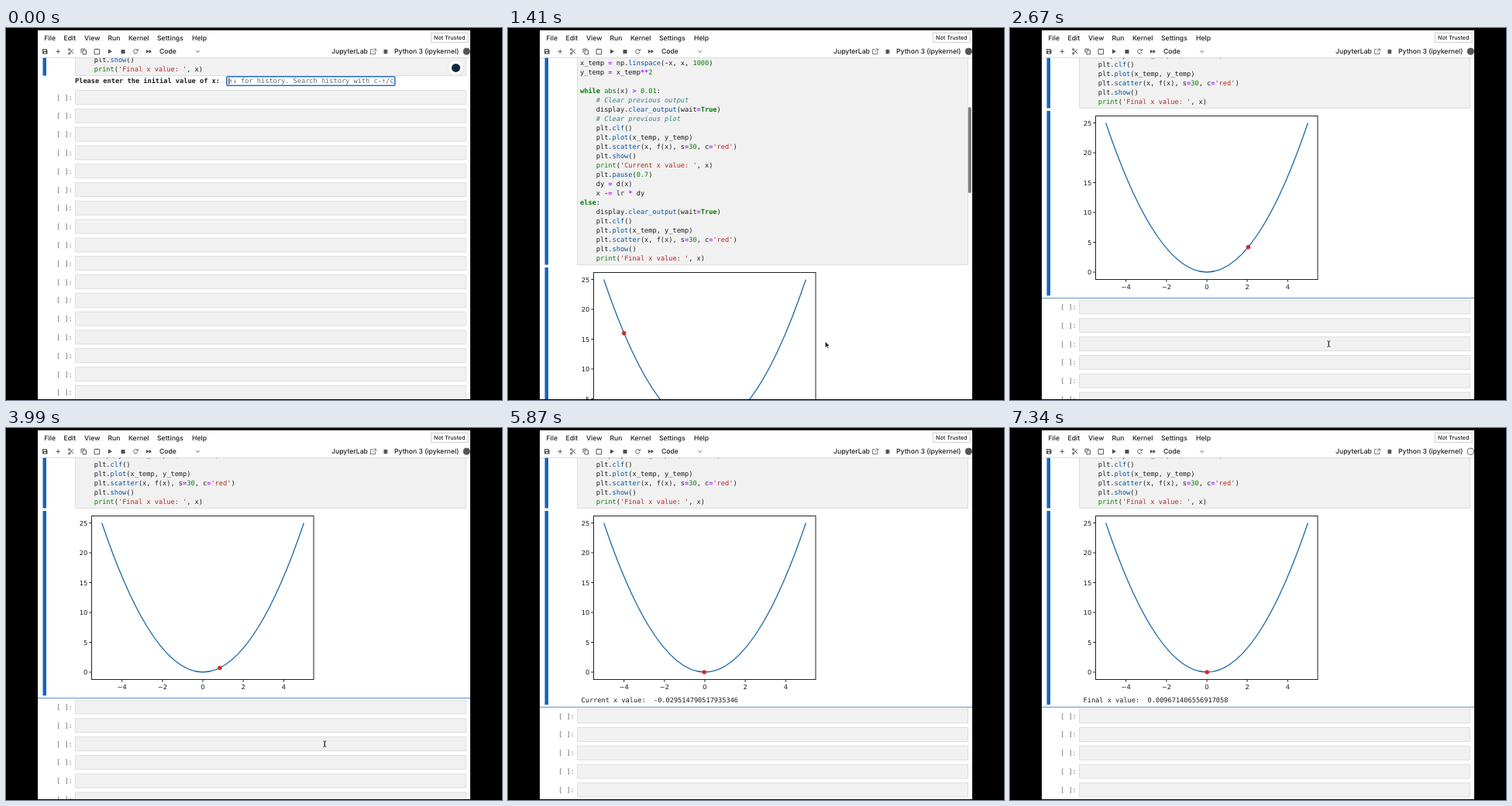
An HTML page for the animation above (7940 ms loop, 640x480 px).

```html
<!DOCTYPE html>
<html lang="en">
<head>
<meta charset="utf-8">
<title>Gradient descent notebook</title>
<style>
  html, body { margin: 0; width: 100%; height: 100%; overflow: hidden; background: #000; }
  svg { display: block; width: 640px; height: 480px; }
  text { white-space: pre; text-rendering: geometricPrecision; fill: #1c1c1c; }
  .ui { font: 500 8.65px Inter, sans-serif; }
  .mono { font: 8.64px "DejaVu Sans Mono", monospace; }
  .tick { font: 8.3px "DejaVu Sans", sans-serif; }
  .kw { fill: #008000; font-weight: bold; }
  .fn, .num { fill: #008000; }
  .str { fill: #ba2121; }
  .com { fill: #408080; font-style: italic; }
  .op { fill: #aa22ff; font-weight: bold; }
  .prop { fill: #0055aa; }
  .bar { fill: #1565c0; }
  .cell { fill: #f1f1f1; stroke: #dedede; }
  .prompt { fill: #707070; }
  .icon { fill: none; stroke: #5a5a5a; stroke-width: 1; }
  .solid { fill: #505050; }
</style>
</head>
<body>
<svg viewBox="0 0 640 480">
  <defs>
    <clipPath id="page"><rect x="41" y="38" width="558" height="441"/></clipPath>
    <clipPath id="window"><rect x="41" y="3" width="558" height="476"/></clipPath>
    <clipPath id="field"><rect x="286" y="8" width="214" height="14"/></clipPath>
  </defs>
  <rect width="640" height="480"/>
  <rect x="41" y="3" width="558" height="476" fill="#fff"/>

  <g clip-path="url(#page)">
    <g id="doc">
      <rect class="cell" x="89.5" y="-340" width="504" height="348.5"/>
      <rect class="bar" x="47.5" y="-340" width="4.5" height="348.5"/>
      <g id="code" class="mono"></g>
      <rect id="outBar" class="bar" x="47.5" y="12" width="4.5"/>
      <rect id="edge" x="41" width="558" height="1.2" fill="#6f9bd3"/>

      <g id="ask" class="mono">
        <text x="89" y="18" font-weight="bold">Please enter the initial value of x:  </text>
        <text id="answer" x="288" y="18">5</text>
        <g id="entry">
          <rect x="284.8" y="9.8" width="217" height="11.5" rx="1.5" fill="none" stroke="#2a6fc4" stroke-width="1.6"/>
          <text id="hint" x="287.5" y="18" clip-path="url(#field)" style="fill:#686868">↑↓ for history. Search history with c-↑/c-↓</text>
          <rect id="caret" y="11.5" width="1" height="8" fill="#111"/>
        </g>
      </g>

      <g id="plot">
        <g id="ticks" class="tick"></g>
        <path id="curve" fill="none" stroke="#1f6aa8" stroke-width="1.3"/>
        <rect x="110.5" y="18.5" width="286.5" height="211" fill="none" stroke="#222"/>
        <circle id="dot" r="2.7" fill="#d32630"/>
        <text id="value" class="mono" x="94.5" y="258.6"></text>
      </g>
      <g id="cells" class="mono"></g>
    </g>
    <rect id="thumb" x="593.8" width="4" height="111" rx="2" fill="#7d7d7d"/>
    <g id="badge">
      <circle cx="580.5" cy="52" r="10.6" fill="#d9d9d9"/>
      <circle cx="580.5" cy="51.4" r="10" fill="#fff"/>
      <circle cx="580.5" cy="51.4" r="5.5" fill="#12293f"/>
    </g>
  </g>

  <path d="M41 38.3H599" stroke="#d4d4d4" stroke-width=".8"/>
  <g id="menu" class="ui"></g>
  <rect x="548.5" y="6.5" width="47.5" height="12" fill="#fff" stroke="#c6c6c6" stroke-width=".8"/>
  <text class="ui" x="552" y="15.2" style="font-size:7.2px">Not Trusted</text>
  <text class="ui" x="198" y="33.4">Code</text>
  <text class="ui" x="420" y="33.4">JupyterLab</text>
  <text class="ui" x="501" y="33.4" id="kernel">Python 3 (ipykernel)</text>

  <g class="icon" clip-path="url(#window)">
    <path class="solid" stroke="none" fill-rule="evenodd" d="M47 27h5l1.5 1.5V33.500H47zM48 28v1.500h3.500V28zM50.200 30.500a1.100 1.100 0 1 0 .01 0z"/>
    <path d="M64.500 30.300h5.400M67.200 27.600v5.400"/>
    <path d="M81.500 27.500l5.500 5.500M81.500 33l5.500-5.500"/>
    <circle cx="81.600" cy="27.800" r="1.200"/><circle cx="81.600" cy="32.900" r="1.200"/>
    <path d="M97 32V27h5M99 28.700h4.500v5.300h-4.500z"/>
    <path d="M114 27.300h6.500v6.500h-6.500zM115.700 27.500h3.200"/>
    <path class="solid" stroke="none" d="M132 27.300l5 3-5 3zM148.500 28h5v5h-5zM181 27.700l3.500 2.600-3.500 2.600zM184.500 27.700l3.500 2.600-3.500 2.600z"/>
    <path d="M169.500 28.700a2.700 2.700 0 1 0 .4 2.300M170.300 27v2.200h-2.200"/>
    <path d="M245.500 29.300l2.200 2.200 2.200-2.200"/>
    <path d="M473.500 27.500h-3v6h6v-3M474.500 27h2.800v2.800M477 27.300l-3.500 3.500" stroke-width=".8"/>
    <path d="M487 28.500h5.500M486.500 30.500h6.500M487 32.500h5.500" stroke-width=".8"/>
    <ellipse class="solid" stroke="none" cx="489.800" cy="30.500" rx="2" ry="2.900"/>
    <circle id="status" cx="594.300" cy="30.200" r="4.100"/>
  </g>

  <path id="arrow" d="M409.300 404.500v8l1.900-1.700 1.300 2.800 1.300-.6-1.300-2.700h2.500z" fill="#111" stroke="#fff" stroke-width=".6"/>
  <path id="beam" d="M409.300 403.800q2 0 2 1.200v5.200q0 1.200-2 1.200M413.300 403.800q-2 0-2 1.200v5.200q0 1.200 2 1.200" fill="none" stroke="#222" stroke-width=".9"/>
</svg>

<script>
const LOOP = 7940;
const $ = id => document.getElementById(id);
const show = (id, on) => $(id).setAttribute('visibility', on ? 'inherit' : 'hidden');
const set = (id, attrs) => { for (const k in attrs) $(id).setAttribute(k, attrs[k]); };

// Menu
$('menu').innerHTML = [['File', 49.5], ['Edit', 74.5], ['View', 101], ['Run', 131.5],
  ['Kernel', 158], ['Settings', 195], ['Help', 240]]
  .map(([label, x]) => `<text x="${x}" y="15.6">${label}</text>`).join('');

// Highlighted code; the last line sits at y = 0 of the document group
const source = `x_temp = np.linspace(-x, x, 1000)
y_temp = x_temp**2

while abs(x) > 0.01:
    # Clear previous output
    display.clear_output(wait=True)
    # Clear previous plot
    plt.clf()
    plt.plot(x_temp, y_temp)
    plt.scatter(x, f(x), s=30, c='red')
    plt.show()
    print('Current x value: ', x)
    plt.pause(0.7)
    dy = d(x)
    x -= lr * dy
else:
    display.clear_output(wait=True)
    plt.clf()
    plt.plot(x_temp, y_temp)
    plt.scatter(x, f(x), s=30, c='red')
    plt.show()
    print('Final x value: ', x)`.split('\n');

const token = /(?<com>#.*)|(?<str>'[^']*')|(?<kw>\b(?:while|else|True)\b)|(?<fn>\b(?:abs|print)\b)|(?<num>\b\d[\d.]*)|(?<prop>(?<=\.)[a-z_]+)|(?<op>[-=*>]+)/g;
const paint = line => line.replace(token, (m, ...rest) => {
  const groups = rest[rest.length - 1];
  const kind = Object.keys(groups).find(k => groups[k] !== undefined);
  return `<tspan class="${kind}">${m.replace('>', '&gt;')}</tspan>`;
});
$('code').innerHTML = source.map((line, i) =>
  `<text x="93" y="${3 - 12.02 * (source.length - 1 - i)}">${paint(line)}</text>`).join('');

// Empty cells
$('cells').innerHTML = Array.from({ length: 20 }, (_, i) => {
  const y = i * 23.8;
  return `<rect class="cell" x="89.5" y="${y - 9}" width="504" height="18"/>
    <text class="prompt" x="65" y="${y + 3}">[ ]:</text>`;
}).join('');

// Plot
const px = x => 254 + 26.07 * x;
const py = y => 220 - 7.7 * y;
const label = n => String(n).replace('-', '−');
let ticks = '';
for (let x = -4; x <= 4; x += 2)
  ticks += `<path d="M${px(x)} 229.5v3.2" stroke="#222"/>
    <text x="${px(x)}" y="241.8" text-anchor="middle">${label(x)}</text>`;
for (let y = 0; y <= 25; y += 5)
  ticks += `<path d="M110.5 ${py(y)}h-3.2" stroke="#222"/>
    <text x="105.3" y="${py(y) + 3.1}" text-anchor="end">${y}</text>`;
$('ticks').innerHTML = ticks;
set('curve', { d: `M${px(-5)} ${py(25)}Q${px(0)} ${py(-25)} ${px(5)} ${py(25)}` });

// Gradient descent on x² with learning rate 0.9
const xs = [5];
while (xs.length < 29) {
  const x = xs[xs.length - 1];
  xs.push(x - 0.9 * (2 * x));
}
const LAST = xs.length - 1;

// Moments of each redraw; ten iterations are cut after the twelfth
const redraws = [940, 1340, 2000, 2340, 2670, 3000, 3330, 3660, 3990, 4330, 4670, 5000,
  5340, 5670, 6000, 6330, 6660, 7000, 7340];
const printDelay = n => n === LAST ? 0 : n === 25 ? 130 : 200;

const ease = u => { u = Math.min(1, Math.max(0, u)); return u * u * (3 - 2 * u); };
function scrollAt(t) {
  const s = Math.floor(t * 15 / 1000) * 1000 / 15;
  return 53 + 244 * ease((s - 1130) / 270) - 202 * ease((s - 1400) / 666);
}

function draw(t) {
  const p = scrollAt(t);
  const k = redraws.filter(r => r <= t).length - 1;
  const plotted = k >= 0;
  const n = k < 12 ? k : k + 10;
  const printed = plotted && t >= redraws[k] + printDelay(n);
  const done = n === LAST;
  const entered = t >= 330;

  set('doc', { transform: `translate(0 ${p})` });
  show('ask', !plotted);
  show('entry', !entered);
  show('hint', t < 270);
  show('answer', t >= 270);
  set('caret', { x: t < 270 ? 287.3 : 293.6 });
  show('badge', t < 400);

  const bottom = !plotted ? 22 : printed ? 265 : 253.3;
  set('outBar', { height: bottom - 15 });
  set('edge', { y: bottom - 0.4 });
  show('outBar', entered);
  show('edge', entered);
  set('cells', { transform: `translate(0 ${!plotted ? 36.5 : printed ? 276.7 : 265})` });

  show('plot', plotted);
  show('value', printed);
  if (plotted) {
    const x = xs[n];
    set('dot', { cx: px(x), cy: py(x * x) });
    $('value').textContent = `${done ? 'Final' : 'Current'} x value:  ${n ? x : '5.0'}`;
  }
  set('status', { fill: done ? '#fff' : '#555' });

  const pointer = t >= 1130 && n < 12;
  show('arrow', pointer && p >= 155);
  show('beam', pointer && p < 155);
  show('thumb', t >= 1130 && t < 2340);
  set('thumb', { y: 102 + (297 - p) * 0.252 });
}

function tick() {
  draw(performance.now() % LOOP);
  requestAnimationFrame(tick);
}
tick();
</script>
</body>
</html>
```
